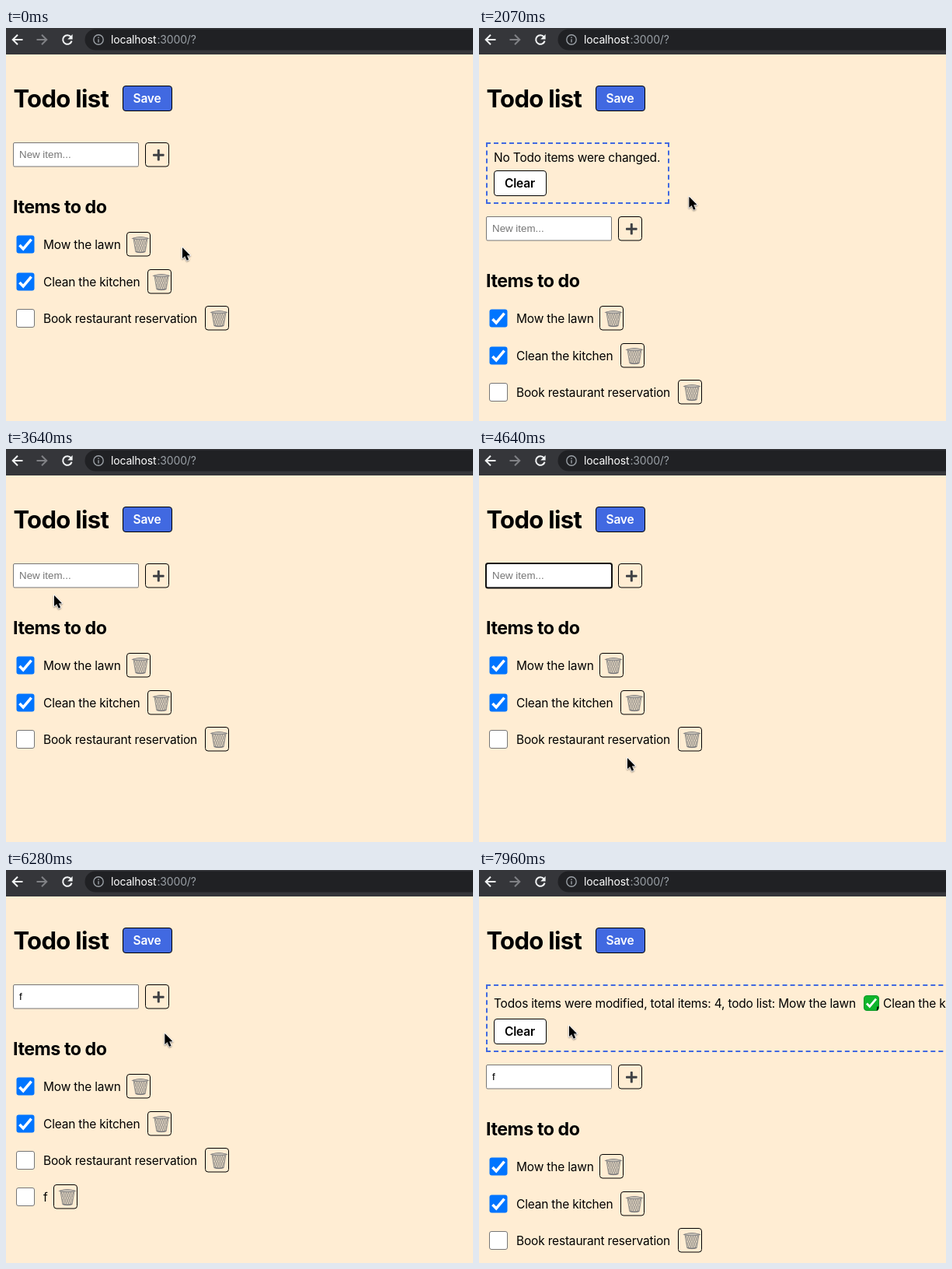
An HTML page with a canvas for the animation above (8 s loop, 601 px wide and 505 px high).

```html
<!DOCTYPE html>
<html lang="en">
<head>
<meta charset="utf-8">
<title>Todo list</title>
<style>
  html, body { margin: 0; width: 100%; height: 100%; overflow: hidden; background: #ffedd3; }
  canvas { display: block; }
</style>
</head>
<body>
<canvas id="stage" width="601" height="505"></canvas>
<script>
const ctx = document.getElementById('stage').getContext('2d');
const LOOP = 8000;
const BLUE = '#4169e1';
const SANS = 'Inter, sans-serif';
const ITEMS = [
  { label: 'Mow the lawn', done: true, bin: 155 },
  { label: 'Clean the kitchen', done: true, bin: 182 },
  { label: 'Book restaurant reservation', done: false, bin: 256 },
  { label: 'f', done: false, bin: 61 }
];
const SAVE = [150, 74, 64, 33];

// Pointer legs: start time, end time, destination
const LEGS = [
  [95, 620, 182, 99], [1210, 1270, 179, 101], [1270, 1350, 181, 59],
  [2889, 2890, 87, 178], [2890, 3100, 55, 199],
  [3580, 3640, 62, 188], [3640, 3930, 95, 164], [4110, 4220, 191, 397],
  [4950, 5350, 361, 142], [5470, 5620, 320, 138], [5620, 5980, 194, 163],
  [6170, 6420, 219, 276], [6470, 6950, 183, 100], [7140, 7250, 184, 98],
  [7550, 7960, 116, 200]
];

const between = (t, a, b) => t >= a && t < b;
const inside = ([x, y], [bx, by, w, h]) => between(x, bx, bx + w) && between(y, by, by + h);
const mix = (a, b, u) => a + (b - a) * u;
const ramp = (t, a, b) => Math.min(1, Math.max(0, (t - a) / (b - a)));

// Circling around the notice, the second round tighter
function orbit(t) {
  const deg = mix(-90, 406.6, ramp(t, 1350, 2070)) + mix(0, 493.4, ramp(t, 2070, 2890));
  const a = deg * Math.PI / 180, u = ramp(t, 2070, 2190);
  return [181 - u + mix(132, 93, u) * Math.cos(a), mix(150, 178, u) + mix(91, 59, u) * Math.sin(a)];
}

function pointer(t) {
  if (between(t, 1350, 2890)) return orbit(t);
  let x = 227, y = 282;
  for (const [from, to, tx, ty] of LEGS) {
    const u = ramp(t, from, to), s = u * u * (3 - 2 * u);
    x = mix(x, tx, s);
    y = mix(y, ty, s);
  }
  return [x, y];
}

function text(str, x, y, size, { weight = 400, color = '#000', track = -0.012, family = SANS } = {}) {
  ctx.font = `${weight} ${size}px ${family}`;
  ctx.letterSpacing = `${track * size}px`;
  ctx.fillStyle = color;
  ctx.fillText(str, x, y);
}

function box(x, y, w, h, r, fill, stroke, line = 1) {
  ctx.beginPath();
  ctx.roundRect(x + line / 2, y + line / 2, w - line, h - line, r);
  if (fill) { ctx.fillStyle = fill; ctx.fill(); }
  if (stroke) { ctx.strokeStyle = stroke; ctx.lineWidth = line; ctx.stroke(); }
}

function shape(d, fill, stroke, line = 1) {
  const p = new Path2D(d);
  if (stroke) { ctx.strokeStyle = stroke; ctx.lineWidth = line; ctx.stroke(p); }
  if (fill) { ctx.fillStyle = fill; ctx.fill(p); }
}

function at(x, y, draw) {
  ctx.save();
  ctx.translate(x, y);
  draw();
  ctx.restore();
}

function toolbar() {
  ctx.fillStyle = '#35363a';
  ctx.fillRect(0, 0, 601, 34);
  box(101, 1, 540, 28, 14, '#202124');
  const arrow = 'M7 0H-6M0.5 -6.3L-5.8 0L0.5 6.3';
  at(14.5, 15, () => shape(arrow, null, '#f1f3f4', 2));
  at(46.5, 15, () => { ctx.scale(-1, 1); shape(arrow, null, '#808185', 2); });
  at(79, 15, () => {
    shape('M4.6 -3.6A5.8 5.8 0 1 0 5.6 1.6', null, '#f1f3f4', 2);
    shape('M6.6 -7V-0.6H0.2Z', '#f1f3f4');
  });
  at(119, 15, () => {
    shape('M6.2 0A6.2 6.2 0 1 1 -6.2 0A6.2 6.2 0 1 1 6.2 0M0 -0.8V3.4M0 -3.4V-1.9', null, '#9aa0a6', 1.4);
  });
  text('localhost', 135, 20, 14, { color: '#fff' });
  text(':3000/?', 194.5, 20, 14, { color: '#9aa0a6' });
}

function tick(x, y, s, line) {
  at(x, y, () => { ctx.scale(s, s); shape('M-7 0.6L-2.6 5.2L7 -6.2', null, '#fff', line); });
}

function checkbox(x, y, done) {
  if (!done) return box(x, y, 24, 24, 2.5, '#fff', '#767676');
  box(x, y, 24, 24, 3, '#0075ff');
  tick(x + 12, y + 12.3, 1.08, 3.3);
}

function bin(x, y) {
  box(x, y, 31, 31.5, 3.5, null, '#000');
  at(x + 18, y + 16.5, () => {
    const body = 'M-9 -8L-6.2 9Q0 11.4 6.2 9L9 -8';
    shape(body, '#d9cdbb');
    ctx.save();
    ctx.clip(new Path2D(body));
    let mesh = '';
    for (let i = -24; i <= 24; i += 3) mesh += `M${i} -9l9 20M${i} -9l-9 20`;
    shape(mesh, null, 'rgba(110,110,112,.55)', 0.8);
    ctx.restore();
    shape(body, null, '#8b8986', 0.9);
    shape('M-9.3 -8.2Q0 -11.2 9.3 -8.2Q0 -5.8 -9.3 -8.2Z', '#c3bdb3', '#77777a', 1.4);
    shape('M-6 8.8Q0 11 6 8.8', null, '#77777a', 1.4);
  });
}

function dashes(x1, y1, x2, y2) {
  const len = Math.hypot(x2 - x1, y2 - y1), n = Math.floor((len + 4) / 10);
  ctx.setLineDash([6, (len - n * 6) / (n - 1)]);
  shape(`M${x1} ${y1}L${x2} ${y2}`, null, BLUE, 2);
  ctx.setLineDash([]);
}

function notice(w, h, clearY) {
  const r = 9 + w, b = 147 + h;
  dashes(9, 148, r, 148);
  dashes(9, b - 1, r, b - 1);
  dashes(10, 147, 10, b);
  dashes(r - 1, 147, r - 1, b);
  box(19, clearY, 68, 33, 3.5, '#fff', '#000');
  text('Clear', 33, clearY + 22, 15.5, { weight: 600 });
}

function entry(y, typed, focus, hover, caret) {
  box(9, y, 162, 31.5, 1.5, '#fff', hover ? '#4f4f4f' : '#767676');
  if (focus) box(8, y - 1, 164, 33.5, 2.5, null, '#101010', 2);
  text(typed || 'New item...', 17, y + 20, 13.333, {
    color: typed ? '#000' : '#757575', track: 0, family: '"Liberation Sans", Arial, sans-serif'
  });
  if (caret) { ctx.fillStyle = '#000'; ctx.fillRect(typed ? 21 : 17, y + 8, 1, 15); }
}

function addButton(y) {
  box(179, y, 31, 31.5, 3.5, null, '#000');
  box(188.5, y + 14.2, 15.6, 4, 0.8, '#3f4145');
  box(194.3, y + 8.4, 4, 15.6, 0.8, '#3f4145');
}

const ARROW = 'M0 0V14L3.2 11L5.7 16.6L8.1 15.6L5.7 10.2H10Z';
const HAND = 'M-1.5 1.2Q0 -.6 1.4 1.2L2 6Q3.4 4.6 4.6 6.3Q6 5.2 7 7Q8.8 6.3 9 8.4'
  + 'L8.6 12L7.3 17H-.3L-1.6 14.3L-4.8 9.8Q-5 7.6 -3 8.3L-1 10Z';
const BEAM = 'M-3 -8Q0 -8 0 -6Q0 -8 3 -8M0 -6V6M-3 8Q0 8 0 6Q0 8 3 8';

function cursor(pos, kind) {
  at(pos[0], pos[1], () => {
    ctx.lineJoin = 'round';
    if (kind === 'text') {
      shape(BEAM, null, 'rgba(255,255,255,.7)', 2.5);
      return shape(BEAM, null, '#000', 1);
    }
    ctx.shadowColor = 'rgba(0,0,0,.35)';
    ctx.shadowBlur = 2;
    ctx.shadowOffsetY = 1;
    if (kind === 'hand') {
      shape(HAND, '#fff', '#000', 2);
      ctx.shadowColor = 'transparent';
      shape('M1.6 10.4V14M3.9 10.4V14M6.2 10.4V14', null, '#000', 0.9);
    } else {
      shape(ARROW, '#000', '#fff', 2);
    }
  });
}

function render(t) {
  const unchanged = between(t, 790, 3350), modified = t >= 7550;
  const shift = unchanged ? 95 : modified ? 103 : 0;
  const top = 147 + shift, clearY = modified ? 191 : 183;
  const pos = pointer(t);
  const field = [9, top, 162, 31];
  const focus = between(t, 4100, 5000);
  const items = ITEMS.slice(0, t >= 6190 ? 4 : 3);
  const rowY = i => Math.round(262.3 + i * 47.3) + shift;

  ctx.fillStyle = '#ffedd3';
  ctx.fillRect(0, 0, 601, 505);
  toolbar();

  text('Todo list', 9.5, 102, 31, { weight: 700, track: -0.022 });
  const pressed = between(t, 730, 790) || between(t, 7490, 7550);
  box(...SAVE, 3.5, pressed ? '#3657c4' : BLUE, '#000');
  text('Save', 163.5, 96, 15.5, { weight: 600, color: '#fff' });

  if (unchanged) {
    notice(236, 79, clearY);
    text('No Todo items were changed.', 19, 172, 15.5);
  } else if (modified) {
    notice(1000, 87, clearY);
    text('Todos items were modified, total items: 4, todo list: Mow the lawn', 19, 177, 15.5);
    text('Clean the kitchen', 520, 177, 15.5);
    box(495, 161, 20, 20, 3.5, '#0fb52c', '#0a9a24');
    tick(505, 171, 0.86, 3.2);
    shape('M512.5 175.5h2l-1.5 5h-1.3z', '#000');
  }

  const caret = focus && (t < 4640 || t >= 4940);
  entry(top, t >= 4940 ? 'f' : '', focus, inside(pos, field), caret);
  addButton(top);
  text('Items to do', 9, 238 + shift, 23.25, { weight: 700, track: -0.02 });

  items.forEach((item, i) => {
    const y = rowY(i);
    checkbox(13, y + 4, item.done);
    text(item.label, 48, y + 22, 15.5);
    bin(item.bin, y);
  });

  const links = [SAVE, [179, top, 31, 31], ...items.map((item, i) => [item.bin, rowY(i), 31, 31])];
  if (shift) links.push([19, clearY, 68, 33]);
  cursor(pos, links.some(r => inside(pos, r)) ? 'hand' : inside(pos, field) ? 'text' : 'arrow');
}

const start = performance.now();
function loop() {
  render((performance.now() - start) % LOOP);
  requestAnimationFrame(loop);
}
loop();
</script>
</body>
</html>
```
